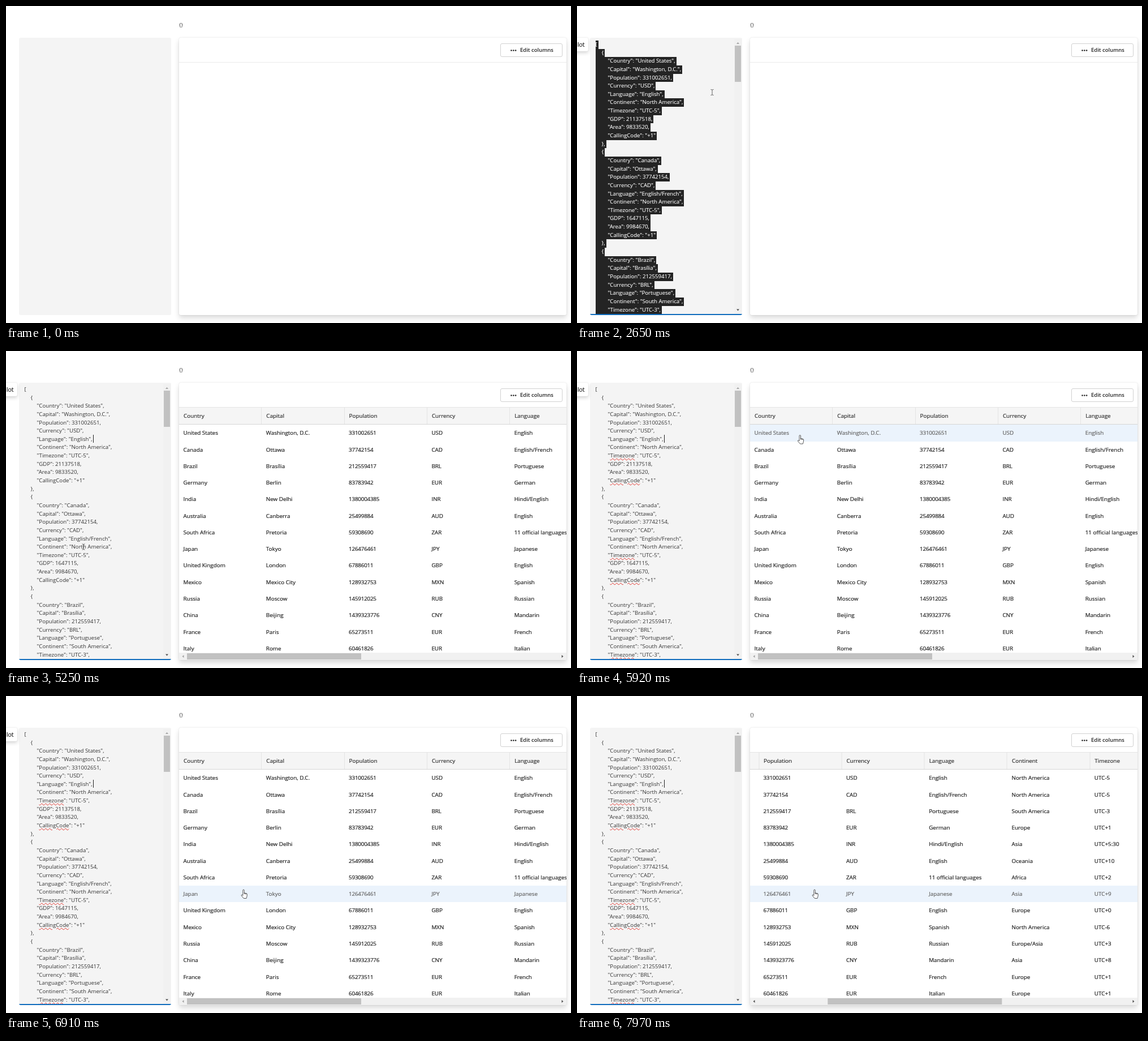
An HTML page for the animation above (8000 ms loop, 999x560 px).

```html
<!DOCTYPE html>
<html lang="en">
<head>
<meta charset="utf-8">
<title>JSON to table</title>
<style>
html, body { margin: 0; width: 100%; height: 100%; overflow: hidden; background: #fff; }
#stage { position: relative; width: 999px; height: 560px; overflow: hidden; font: 9.65px/14.65px "Open Sans", "Noto Sans", sans-serif; color: #333; }
#stage div, #stage svg { position: absolute; box-sizing: border-box; }
#stage svg { overflow: visible; }
.braces { left: 306px; top: 26.6px; font-size: 9px; }
#editor { left: 23px; top: 56px; width: 269px; height: 490px; background: #f4f4f4; border-radius: 3px; overflow: hidden; }
#json { left: 9.5px; top: 5px; width: 245px; height: 483px; overflow: hidden; }
#json p { margin: 0; height: 14.65px; white-space: pre; }
#json span { display: inline-block; height: 14.65px; padding-right: 2px; }
#json.selected span { background: #242424; color: #fff; -webkit-text-stroke: .12px; }
#json.checked u { text-decoration: underline wavy #e0332c .9px; text-underline-offset: 1px; }
u { text-decoration: none; }
#focusLine { left: 0; bottom: 0; width: 100%; height: 1.6px; }
#caret { width: 1px; background: #222; }
#vbar { left: 255px; top: 2px; width: 13px; height: 486px; background: #f1f1f1; }
#vbar div { left: 1px; top: 12px; width: 11px; height: 64px; background: #c1c1c1; }
#card { left: 306px; top: 56px; width: 685px; height: 490px; background: #fff; border-radius: 3px; box-shadow: 0 0 2px rgba(0,0,0,.14), 0 5px 10px rgba(0,0,0,.15); }
#toolbar { left: 0; top: 0; width: 685px; height: 44px; border-bottom: 1px solid #ebebeb; }
#edit { left: 568px; top: 9.5px; width: 110px; height: 24px; border: 1px solid #d1d1d1; border-radius: 3px; color: #242424; font-weight: 600; font-size: 9.5px; line-height: 22px; padding-left: 34px; white-space: nowrap; }
#edit svg { left: 17px; top: 10px; }
#table { left: 0; top: 43px; width: 685px; height: 447px; overflow: hidden; border-radius: 0 0 3px 3px; font-weight: 500; font-size: 9.85px; color: #242424; -webkit-text-stroke: .22px; }
#head { left: 0; top: 0; width: 685px; height: 31px; background: #f5f5f5; border: solid #e4e4e4; border-width: 1px 0; border-bottom-color: #d6d6d6; color: #333; }
#rows { left: 0; top: 31.3px; width: 685px; height: 402.7px; overflow: hidden; }
.row { left: 0; width: 685px; height: 29.27px; }
.row.hover { background: #ebf3fc; color: #666; }
.cell { width: 146.3px; height: 29.27px; line-height: 29.27px; padding-left: 7.5px; white-space: nowrap; }
.cell.number { letter-spacing: -.22px; }
#head .cell { padding-left: 8px; border-right: 1px solid #e4e4e4; }
.strip { left: 0; top: 0; }
#hbar { left: 0; top: 434px; width: 685px; height: 13px; background: #f1f1f1; }
#hbar div { left: 14px; top: 1px; width: 308px; height: 11px; background: #c1c1c1; }
#tip { left: -60px; top: 56px; width: 80px; height: 24px; padding-right: 6.5px; background: #fff; border-radius: 3px; box-shadow: 0 0 2px rgba(0,0,0,.14), 0 3px 6px rgba(0,0,0,.16); color: #242424; font-size: 10.4px; line-height: 24px; text-align: right; -webkit-text-stroke: .2px; }
#spot { left: 228px; top: 142px; width: 20px; height: 20px; border-radius: 50%; background: rgba(255,247,70,.8); }
#pointer { left: 0; top: 0; }
</style>
</head>
<body>
<div id="stage">
  <div class="braces">{}</div>
  <div id="editor">
    <div id="json"></div>
    <div id="vbar"><div></div>
      <svg width="13" height="486"><path d="M4 9h5L6.500 6z" fill="#a3a3a3"/><path d="M4 477.500h5L6.500 480.500z" fill="#505050"/></svg>
    </div>
    <div id="focusLine"></div>
  </div>
  <div id="caret"></div>
  <div id="card">
    <div id="toolbar"></div>
    <div id="edit"><svg width="12" height="3" fill="#242424"><circle cx="1.500" cy="1.500" r="1.300"/><circle cx="5.300" cy="1.500" r="1.300"/><circle cx="9.100" cy="1.500" r="1.300"/></svg>Edit columns</div>
    <div id="table">
      <div id="head"><div class="strip"></div></div>
      <div id="rows"></div>
      <div id="hbar"><div></div>
        <svg width="685" height="13"><path id="leftArrow" d="M8.500 4v5L5.500 6.500z"/><path d="M676.500 4v5l3-2.500z" fill="#505050"/></svg>
      </div>
    </div>
  </div>
  <div id="tip">pilot</div>
  <div id="spot"></div>
  <svg id="pointer" width="1" height="1">
    <path id="beam" d="M-2.500-5Q0-5 0-4Q0-5 2.500-5M0-4V4M-2.500 5Q0 5 0 4Q0 5 2.500 5" fill="none" stroke="#333" stroke-width=".75"/>
    <path id="arrow" d="M0 0V14l3.200-3 2.200 5 2-.9-2.200-4.800H10z" fill="#fff" stroke="#111" stroke-width=".8"/>
    <g id="hand" transform="translate(-4.700 0)" fill="#fff" stroke="#222" stroke-width=".75" stroke-linejoin="round">
      <path d="M3.500 10V1.300a1.200 1.200 0 0 1 2.400 0V6l4 .8q1.300.4 1.200 1.800l-.4 3.600-1 3.300H5L1 10.800q-.7-1.300.6-1.600 1 0 1.900 1.300z"/>
      <path d="M5.900 5.500v2.500M7.700 6.400v1.900M9.400 6.800v1.700" fill="none"/>
    </g>
  </svg>
</div>
<script>
const $ = id => document.getElementById(id);
const LOOP = 8000, STEP = 200 / 3, COL = 146.3, ROW = 29.27, SCROLL = 276.5;

const columns = ['Country', 'Capital', 'Population', 'Currency', 'Language', 'Continent', 'Timezone'];
const records = `United States|Washington, D.C.|331002651|USD|English|North America|UTC-5
Canada|Ottawa|37742154|CAD|English/French|North America|UTC-5
Brazil|Brasília|212559417|BRL|Portuguese|South America|UTC-3
Germany|Berlin|83783942|EUR|German|Europe|UTC+1
India|New Delhi|1380004385|INR|Hindi/English|Asia|UTC+5:30
Australia|Canberra|25499884|AUD|English|Oceania|UTC+10
South Africa|Pretoria|59308690|ZAR|11 official languages|Africa|UTC+2
Japan|Tokyo|126476461|JPY|Japanese|Asia|UTC+9
United Kingdom|London|67886011|GBP|English|Europe|UTC+0
Mexico|Mexico City|128932753|MXN|Spanish|North America|UTC-6
Russia|Moscow|145912025|RUB|Russian|Europe/Asia|UTC+3
China|Beijing|1439323776|CNY|Mandarin|Asia|UTC+8
France|Paris|65273511|EUR|French|Europe|UTC+1
Italy|Rome|60461826|EUR|Italian|Europe|UTC+1`.split('\n').map(line => line.split('|'));

const cells = values => values.map((v, i) =>
  `<div class="cell${/^\d+$/.test(v) ? ' number' : ''}" style="left:${i * COL}px">${v}</div>`).join('');
document.querySelector('#head .strip').innerHTML = cells(columns);
$('rows').innerHTML = records.map((r, i) =>
  `<div class="row" style="top:${i * ROW}px"><div class="strip">${cells(r)}</div></div>`).join('');

// Editor text: the first three records with their extra fields.
const extras = [[21137518, 9833520, '+1'], [1647115, 9984670, '+1'], [1839758, 8515767, '+55']];
const lines = [[0, '[']];
extras.forEach(([gdp, area, code], i) => {
  lines.push([1, '{']);
  columns.forEach((name, c) => {
    const value = records[i][c];
    const key = name === 'Timezone' ? `<u>${name}</u>` : name;
    lines.push([2, `"${key}": ${name === 'Population' ? value : `"${value}"`},`]);
  });
  lines.push([2, `"GDP": ${gdp},`], [2, `"Area": ${area},`], [2, `"<u>CallingCode</u>": "${code}"`], [1, '},']);
});
$('json').innerHTML = lines.map(([depth, text]) =>
  `<p><span style="padding-left:${depth * 11}px">${text}</span></p>`).join('');

// Pointer route: time, x, y
const route = [
  [390, 541, 36], [600, 440, 85], [800, 285, 146], [870, 258, 155], [990, 239, 152.5],
  [3920, 239, 152.5], [4100, 190, 85], [4250, 110, 65], [4400, 71, 110], [4560, 80, 200],
  [4720, 116, 259], [4860, 137, 346], [5260, 137, 346], [5580, 392, 143], [5860, 392, 143],
  [6190, 404, 172], [6300, 407, 205], [6510, 420, 342]
];
function locate(t) {
  const next = route.findIndex(p => p[0] > t);
  if (next < 0) return route[route.length - 1].slice(1);
  if (next === 0) return route[0].slice(1);
  const [t0, x0, y0] = route[next - 1], [t1, x1, y1] = route[next];
  const k = (t - t0) / (t1 - t0);
  return [x0 + (x1 - x0) * k, y0 + (y1 - y0) * k];
}

const within = (t, from, to) => t >= from && t < to;
const progress = (t, from, to) => Math.min(1, Math.max(0, (t - from) / (to - from)));
const show = (el, on) => { el.style.visibility = on ? 'visible' : 'hidden'; };
const rows = [...document.querySelectorAll('.row')];
const strips = [...document.querySelectorAll('.strip')];

function drawPointer(t, motionTime) {
  const [x, y] = locate(motionTime);
  const visible = t >= 390;
  const filled = t >= 2850;
  const overEditor = x < 292;
  const row = filled && x > 306 ? Math.floor((y - 130.3) / ROW) : -1;
  $('pointer').style.transform = `translate(${x}px,${y}px)`;
  show($('beam'), visible && overEditor);
  show($('hand'), visible && row >= 0);
  show($('arrow'), visible && !overEditor && row < 0);
  rows.forEach((el, i) => el.classList.toggle('hover', i === row));
}

function drawEditor(t) {
  const pressed = within(t, 1190, 1460) || within(t, 3590, 3790);
  const selected = within(t, 2650, 3790);
  show($('spot'), pressed);
  show($('json'), t >= 2650);
  show($('vbar'), t >= 2650);
  $('json').classList.toggle('selected', selected);
  $('json').classList.toggle('checked', t >= 5400);

  const line = $('focusLine').style;
  line.background = t < 1460 ? '#44546a' : pressed ? '#6f9fc8' : '#0f6cbd';
  line.transform = `scaleX(${progress(t, 1160, 1380)})`;

  const late = t >= 3790;
  const blink = Math.floor((t - (late ? 3730 : 1190)) / 530) % 2 === 0;
  const caret = $('caret').style;
  show($('caret'), t >= 1190 && blink && !selected);
  [caret.left, caret.top, caret.height] = late ? ['154px', '148px', '14px'] : ['32px', '60px', '15px'];

  const enter = progress(t, 1320, 1600);
  show($('tip'), within(t, 1320, 7310));
  $('tip').style.opacity = enter;
  $('tip').style.transform = `translateX(${8 * (1 - enter)}px)`;
}

function drawTable(t, motionTime) {
  show($('table'), t >= 2850);
  const p = progress(motionTime, 7250, 7710);
  const shift = SCROLL * p * p * (3 - 2 * p);
  strips.forEach(s => { s.style.transform = `translateX(${-shift}px)`; });
  $('hbar').firstElementChild.style.transform = `translateX(${shift * .446}px)`;
  $('leftArrow').setAttribute('fill', shift > 0 ? '#505050' : '#a3a3a3');
}

function frame() {
  const t = performance.now() % LOOP;
  const motionTime = 390 + Math.floor((t - 375) / STEP) * STEP;
  drawPointer(t, motionTime);
  drawEditor(t);
  drawTable(t, motionTime);
  requestAnimationFrame(frame);
}
frame();
</script>
</body>
</html>
```
